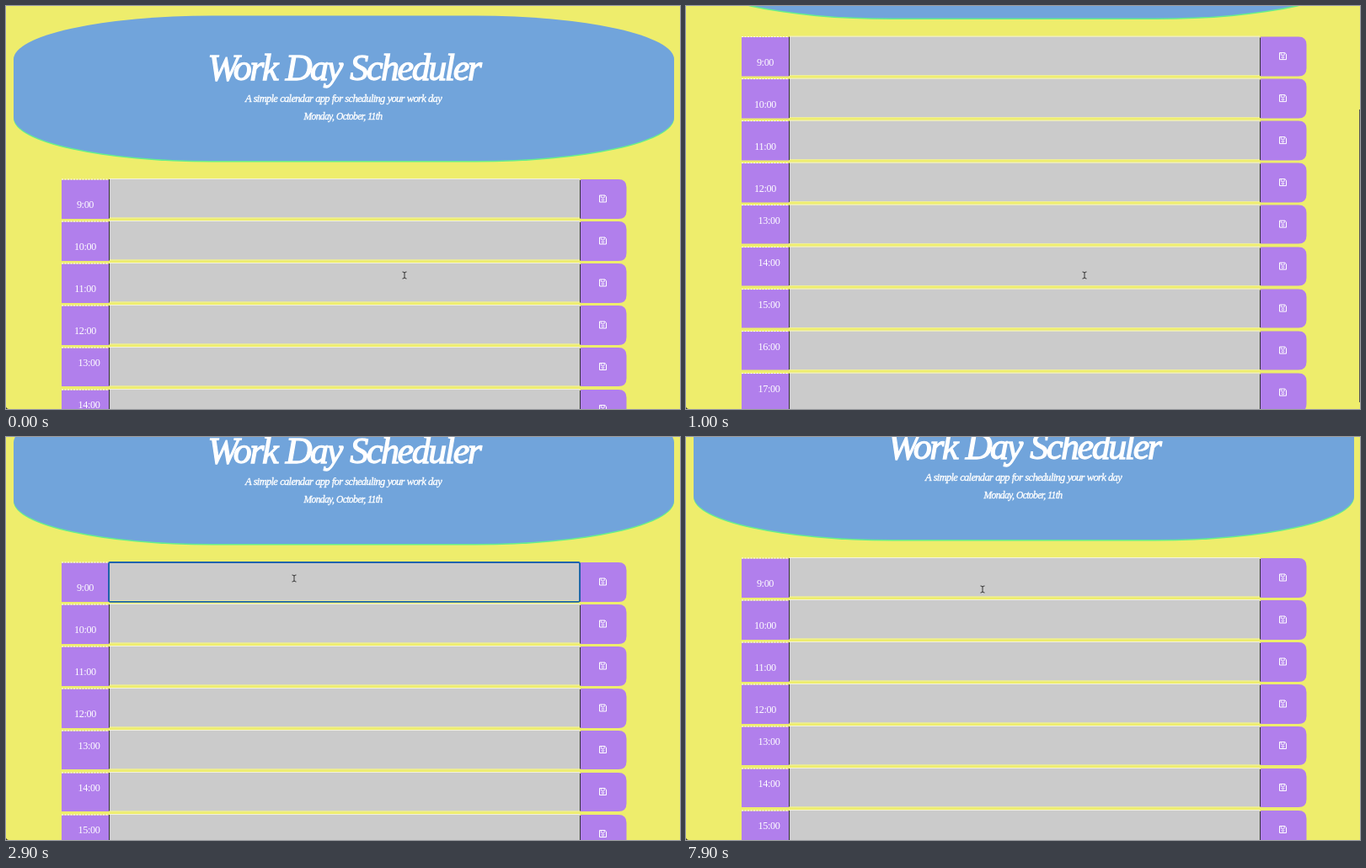
These frames come from a looping animation (800 by 479 pixels, 8000 ms). An HTML page:

```html
<!DOCTYPE html>
<html lang="en">
<head>
<meta charset="utf-8">
<title>Work Day Scheduler</title>
<style>
@property --scroll { syntax: "<number>"; inherits: true; initial-value: 0; }

html, body { margin: 0; width: 100%; height: 100%; overflow: hidden; background: #eeed6c; }

svg { display: block; width: 100%; height: 100%; animation: scroll 8s linear infinite; }
.page { transform: translateY(calc(var(--scroll) * -1px)); }
.thumb {
  transform: translateY(calc(var(--scroll) * 0.726px));
  animation: thumb-fade 8s linear infinite;
}

text { fill: #fff; font: 12.2px "Liberation Serif", serif; letter-spacing: -0.03em; }
.heading text {
  font-style: italic;
  letter-spacing: -0.055em;
  word-spacing: 0.045em;
  text-anchor: middle;
  stroke: #fff;
  stroke-width: 0.35px;
}
.heading .title { font-size: 44px; stroke-width: 1.3px; }
.heading .lead { font-size: 12.5px; }
.heading .date { font-size: 11.6px; }
.hour { text-anchor: middle; }

.focus { animation: focus 8s step-end infinite; }
.caret { animation: caret 8s step-end infinite; }
.note tspan { animation: 8s step-end infinite; }
.note tspan:nth-child(1) { animation-name: type-1; }
.note tspan:nth-child(2) { animation-name: type-2; }
.note tspan:nth-child(3) { animation-name: type-3; }

.pointer { animation: move 8s ease-in-out infinite; }
.ibeam { animation: ibeam 8s step-end infinite; }
.arrow { animation: arrow 8s step-end infinite; }

@keyframes scroll {
  0%, 5% { --scroll: 0; }
  8.5%, 11.25% { --scroll: 181; }
  16.25% { --scroll: 135; }
  27.5%, 98.74% { --scroll: 57; }
  98.75%, 100% { --scroll: 62; }
}
@keyframes thumb-fade {
  0%, 5.5% { opacity: 0; }
  6%, 29% { opacity: 1; }
  33%, 100% { opacity: 0; }
}
@keyframes focus {
  0% { opacity: 0; }
  34.5% { opacity: 1; }
  82.5%, 100% { opacity: 0; }
}
@keyframes caret {
  0% { opacity: 0; transform: none; }
  40% { opacity: 1; transform: none; }
  46.25% { opacity: 1; transform: translateX(5.7px); }
  48.75% { opacity: 1; transform: translateX(10.8px); }
  51.25% { opacity: 1; transform: translateX(15.5px); }
  56.25% { opacity: 0; transform: translateX(15.5px); }
  62.5% { opacity: 1; transform: translateX(15.5px); }
  68.75% { opacity: 0; transform: translateX(15.5px); }
  75% { opacity: 1; transform: translateX(15.5px); }
  81.25%, 100% { opacity: 0; transform: translateX(15.5px); }
}
@keyframes type-1 { 0%, 82.5%, 100% { fill-opacity: 0; } 46.25% { fill-opacity: 1; } }
@keyframes type-2 { 0%, 82.5%, 100% { fill-opacity: 0; } 48.75% { fill-opacity: 1; } }
@keyframes type-3 { 0%, 82.5%, 100% { fill-opacity: 0; } 51.25% { fill-opacity: 1; } }

@keyframes move {
  0%, 27.5% { transform: translate(473px, 320px); }
  34%, 58.5% { transform: translate(342px, 168px); }
  61.25% { transform: translate(248px, 94px); }
  68.75%, 73.75% { transform: translate(110px, 30px); }
  77.5%, 86.25% { transform: translate(67px, -9px); }
  96.25%, 100% { transform: translate(352px, 181px); }
}
@keyframes ibeam {
  0%, 94%, 100% { opacity: 1; }
  46.25% { opacity: 0; }
}
@keyframes arrow {
  0%, 94%, 100% { opacity: 0; }
  59.5% { opacity: 1; }
}
</style>
</head>
<body>
<svg viewBox="0 0 800 479" preserveAspectRatio="none">
  <defs>
    <g id="save" fill="none" stroke="#fff">
      <path d="M-4-4H2.4L4-2.4V4H-4Z"/>
      <path d="M-2.2-3.8V-1.3H1.8V-3.8" stroke-width=".8"/>
      <circle cy="1.4" r="1.2" stroke-width=".9"/>
    </g>
    <path id="beam" d="M-2.5-4Q0-4 0-2.8Q0-4 2.5-4M0-3V3M-2.5 4Q0 4 0 2.8Q0 4 2.5 4" fill="none"/>
  </defs>

  <g class="page">
    <g class="heading">
      <rect x="9" y="13" width="784" height="172.5" rx="235" ry="52" fill="#66ee8c"/>
      <rect x="9" y="11.5" width="784" height="172.5" rx="235" ry="52" fill="#71a4db"/>
      <text class="title" x="401" y="87.5">Work Day Scheduler</text>
      <text class="lead" x="400.5" y="113.5">A simple calendar app for scheduling your work day</text>
      <text class="date" x="400" y="134.5">Monday, October, 11th</text>
    </g>
    <g id="rows"></g>
    <rect class="focus" x="122" y="206" width="559" height="46.8" rx="1.5" fill="none" stroke="#1763ad" stroke-width="1.8"/>
    <text class="note" x="131" y="221.5"><tspan>h</tspan><tspan>e</tspan><tspan>y</tspan></text>
    <rect class="caret" x="131" y="210" width="1" height="14" fill="#fff"/>
  </g>

  <rect class="thumb" x="799" width="1" height="348" fill="#555"/>
  <path d="M0 476.5Q.5 478.5 3 479H0Z" fill="#333"/>

  <g class="pointer">
    <g class="ibeam">
      <use href="#beam" stroke="#fff" stroke-width="2" opacity=".35"/>
      <use href="#beam" stroke="#222" stroke-width="1"/>
    </g>
    <path class="arrow" d="M0 0V8.5L2 6.7 3.4 9.6 4.8 9 3.4 6.2H6Z" fill="#111" stroke="#fff" stroke-width=".6"/>
  </g>
</svg>
<script>
const row = (hour) => {
  const late = hour > 12;
  const top = 206 + (hour - 9) * 50;
  const bottom = top + (late ? 46 : 47);
  const cellBottom = top + 45.5;
  return `
    <path d="M66 ${top + 0.5}H122V${bottom}H66Z" fill="#b17fec"/>
    <path d="M66 ${top}H122" stroke="#fff" stroke-dasharray="2 1.5"/>
    <path d="M123 ${top}H681V${cellBottom}H123Z" fill="#cbcbcb"/>
    <path d="M123 ${top - 0.5}H681" stroke="#f3f2dc"/>
    <path d="M123 ${cellBottom + 0.5}H681" stroke="#f0efa0"/>
    <path d="M682 ${top}H727Q736.5 ${top} 736.5 ${top + 9.5}V${bottom - 9.5}Q736.5 ${bottom} 727 ${bottom}H682Z" fill="#b17fec"/>
    <path d="M122.5 ${top}V${bottom - 0.5}M681.5 ${top + 1}V${bottom - 0.5}" stroke="#333"/>
    <text class="hour" x="${late ? 98.5 : 94}" y="${top + (late ? 22 : 34)}">${hour}:00</text>
    <use href="#save" x="708.5" y="${top + (late ? 22.5 : 23)}"/>`;
};
document.getElementById("rows").innerHTML =
  Array.from({ length: 9 }, (_, i) => row(i + 9)).join("");
</script>
</body>
</html>
```
